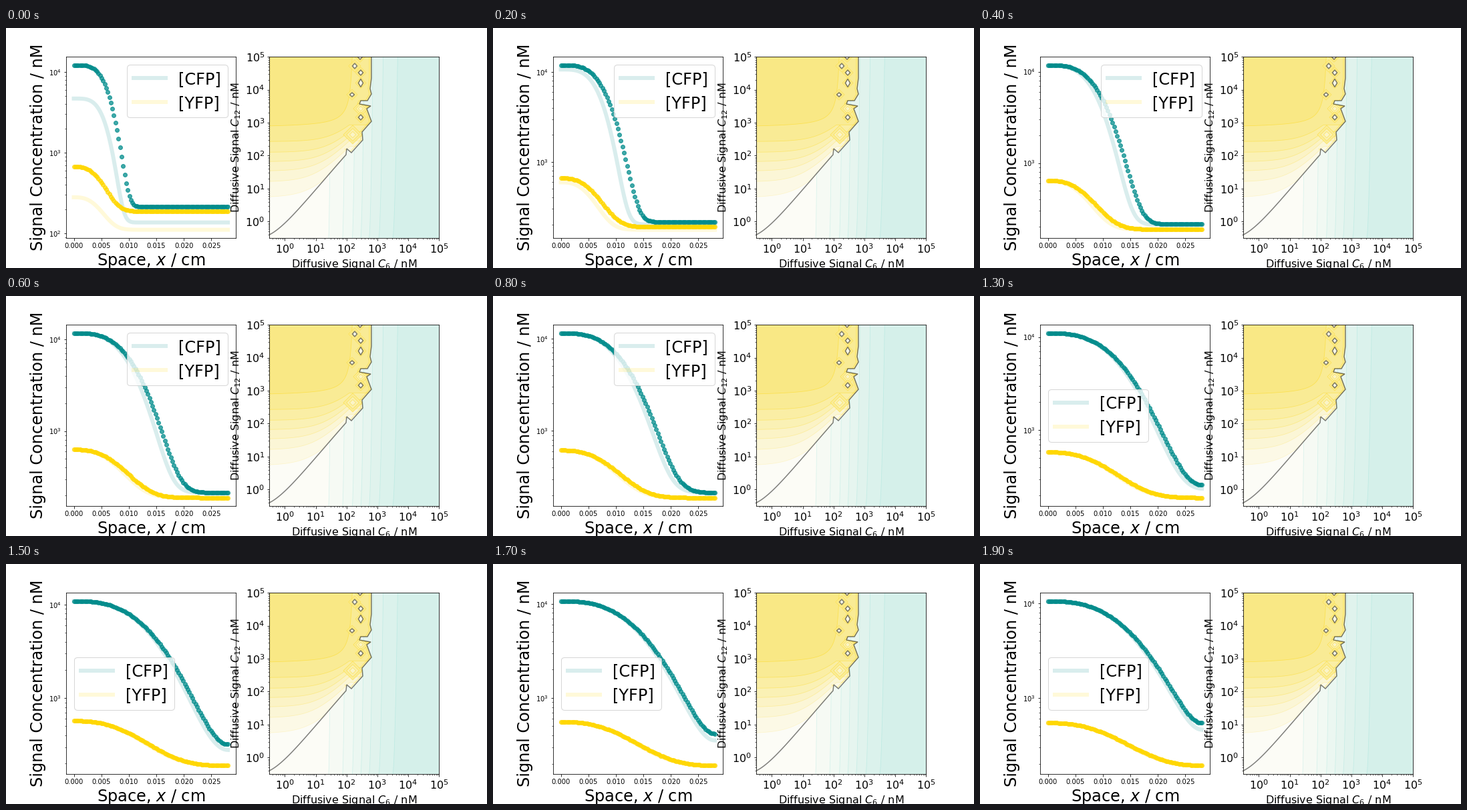
A matplotlib script that plays this animation: 720 by 360 pixels, repeating every 2000 ms.

```python
import numpy as np
import matplotlib.pyplot as plt
from matplotlib.animation import FuncAnimation
from matplotlib.patches import Polygon
from matplotlib.ticker import LogLocator
from matplotlib.transforms import Affine2D

plt.rcParams["font.family"] = "DejaVu Sans"
DPI, FRAMES, STEP = 72, 20, 100
LENGTH = 0.028
SPAN = 230.5                 # plotted length of the space axis in pixels

fig, (ax, phase) = plt.subplots(1, 2, figsize=(10, 5), dpi=DPI)
fig.subplots_adjust(left=0.125, right=0.9, bottom=0.125, top=0.88, wspace=0.2)

# ---------- left panel: spreading signals ----------
SIGNALS = [
    dict(color="darkcyan", label="[CFP]", base=214, peak=12190, decay=0.0076,
         front=48.9, scale=1.463, growth=0.33, steep=3.75, flat=0.135,
         base_dip=0.36, amp_dip=0.62),
    dict(color="gold", label="[YFP]", base=188.5, peak=673, decay=0.011,
         front=41.0, scale=2.75, growth=0.45, steep=2.75, flat=0.055,
         base_dip=0.41, amp_dip=0.65),
]
space = np.linspace(0, LENGTH, 101)
dist = space / LENGTH * SPAN


def shape(s, t):
    """Flat-topped front at time t, mirrored at the closed right end."""
    age = 1 + t / s["scale"]
    half = s["front"] * age ** s["growth"]
    power = s["steep"] * age ** -s["flat"]
    bump = lambda d: 0.5 ** ((d / half) ** power)
    return bump(dist) + bump(2 * SPAN - dist)


def height(s, t):
    return s["peak"] * np.exp(-s["decay"] * t) - s["base"]


def signal(s, t):
    return s["base"] + height(s, t) * shape(s, t)


def response(s, t):
    """Reporter that starts low and then trails the signal."""
    fade = np.exp(-0.87 * t)
    late = shape(s, t - 1.2 + 0.95 * fade)
    return (s["base"] * (1 - s["base_dip"] * fade)
            + height(s, t) * (1 - s["amp_dip"] * fade) * late)


bands = [ax.plot(space, response(s, 0), color=s["color"], lw=6, alpha=0.15,
                 label=s["label"])[0] for s in SIGNALS]
dots = [ax.plot(space, signal(s, 0), "o", color=s["color"], ms=6,
                alpha=0.75)[0] for s in SIGNALS]
ax.set_yscale("log")
ax.set_xlabel("Space, $x$ / cm", fontsize=24)
ax.set_ylabel("Signal Concentration / nM", fontsize=24)
legend = ax.legend(fontsize=24, loc="upper right")

# ---------- right panel: phase diagram, laid out in stage pixels ----------
phase.set(xscale="log", yscale="log",
          xlim=(10 ** -0.5, 1e5), ylim=(10 ** -0.5, 1e5))
for axis in (phase.xaxis, phase.yaxis):
    axis.set_major_locator(LogLocator(numticks=12))
    axis.set_minor_locator(LogLocator(subs=range(2, 10), numticks=12))
phase.tick_params(labelsize=16)
phase.set_xlabel("Diffusive Signal $C_6$ / nM", fontsize=16)
phase.set_ylabel("Diffusive Signal $C_{12}$ / nM", fontsize=16)

X0, X1, Y0, Y1 = 394.4, 648, 43.2, 315
pixels = (Affine2D().scale(1 / DPI, -1 / DPI).translate(0, 5)
          + fig.dpi_scale_trans)
CREAM, MINT, SUN = (252, 252, 246), (213, 240, 234), (249, 232, 133)
TEAL_LINE, DARK = (0.25, 0.8, 0.75, 0.16), (0, 0, 0, 0.5)


def mix(tint, f):
    return tuple((np.array(CREAM) * (1 - f) + np.array(tint) * f) / 255)


def gold_line(f):
    return (1, 0.84, 0, 0.08 + 0.34 * f)


def area(points, fill, z, clip=None):
    patch = Polygon(points, fc=fill, ec="none", zorder=z, transform=pixels)
    phase.add_artist(patch)
    if clip is not None:
        patch.set_clip_path(clip)
    return patch


def stroke(points, color, z, lw=0.8, clip=None, closed=False):
    patch = Polygon(points, closed=closed, fc="none", ec=color, lw=lw,
                    zorder=z, transform=pixels)
    phase.add_artist(patch)
    if clip is not None:
        patch.set_clip_path(clip)


def logit(k):
    """Where a saturating response reaches k eighths of its maximum."""
    return np.log(k / (8 - k))


phase.set_facecolor(mix(MINT, 0))

# mint bands, growing to the right
ys = np.linspace(Y1, Y0, 40)
for k in range(1, 8):
    lean = (2.3 + 0.7 * k) * ((Y1 - ys) / (Y1 - Y0)) ** 0.6
    curve = list(zip(531 + 24.7 * logit(k) + lean, ys))
    area(curve + [(X1, Y0), (X1, Y1)], mix(MINT, k / 7), 0.5)
    stroke(curve, TEAL_LINE, 0.55)

# dividing line: smooth lower arm, then a ragged edge
xs = np.linspace(X0, 509, 40)
u = xs - X0
arm = list(zip(xs, 310 - u * (0.5 + 0.58 * (1 - np.exp(-u / 40)))))
ragged = [(510, 181), (517, 187), (534, 168), (533, 156), (547, 140),
          (540, 121), (546, 117), (529, 114), (531, 109), (541, 109),
          (547, 99), (545, 91), (547, 75), (547, Y0)]
border = arm + ragged
region = area(border + [(X0, Y0)], mix(SUN, 0), 0.6)

# yellow bands, growing upwards and bending towards the dividing line
xs = np.linspace(X0, 548, 90)
for k in range(1, 7):
    bend = np.log10(1 + 10 ** ((np.minimum(xs, 514) - 450 - 8 * k) / 46))
    curve = list(zip(xs, 200.5 - 27.5 * logit(k) - 49 * bend))
    area(curve + [(548, Y0), (X0, Y0)], mix(SUN, k / 7), 0.7, region)
    stroke(curve, gold_line(k / 7), 0.75, clip=region)
xs = np.linspace(X0, 518.2, 90)
curve = list(zip(xs, 150 - 400 / (522 - xs)))
area(curve + [(519, Y0), (X0, Y0)], mix(SUN, 1), 0.8, region)
stroke(curve + [(519, Y0)], gold_line(1), 0.85, clip=region)
stroke([(x - 3, y) for x, y in ragged], gold_line(1), 0.86, clip=region)


def diamond(x, y, rx, ry):
    return [(x - rx, y), (x, y - ry), (x + rx, y), (x, y + ry)]


# failed cells: centre, reach and half height of the dark loop, if any
CELLS = [(519, 160, 14, 0), (531, 121, 11, 0), (518, 100, 8, 3),
         (522, 57, 9, 4), (531, 67, 8, 4), (531, 82.5, 8, 6),
         (531, 134, 8, 4), (530, Y0, 8, 4)]
for x, y, reach, loop in CELLS:
    for r in range(3):
        rim = diamond(x, y, reach * (1 - r / 3), reach * (1 - r / 3))
        area(rim, mix(SUN, 0.82 - 0.2 * r), 0.9, region)
        stroke(rim, gold_line(1), 0.9, clip=region, closed=True)
    if loop:
        rim = diamond(x, y, 3.5, loop)
        area(rim, mix(SUN, 0.12), 1)
        stroke(rim, DARK, 1, lw=1.5, closed=True)
stroke(border, DARK, 1.1, lw=1.5)


# ---------- motion ----------
def update(k):
    for s, band, dot in zip(SIGNALS, bands, dots):
        band.set_ydata(response(s, k))
        dot.set_ydata(signal(s, k))
    ax.relim()
    ax.autoscale_view()
    legend.set_loc("upper right" if k < 10 else "center left")
    return bands + dots


anim = FuncAnimation(fig, update, frames=FRAMES, interval=STEP, repeat=True,
                     repeat_delay=0, blit=False)
plt.show()
```
